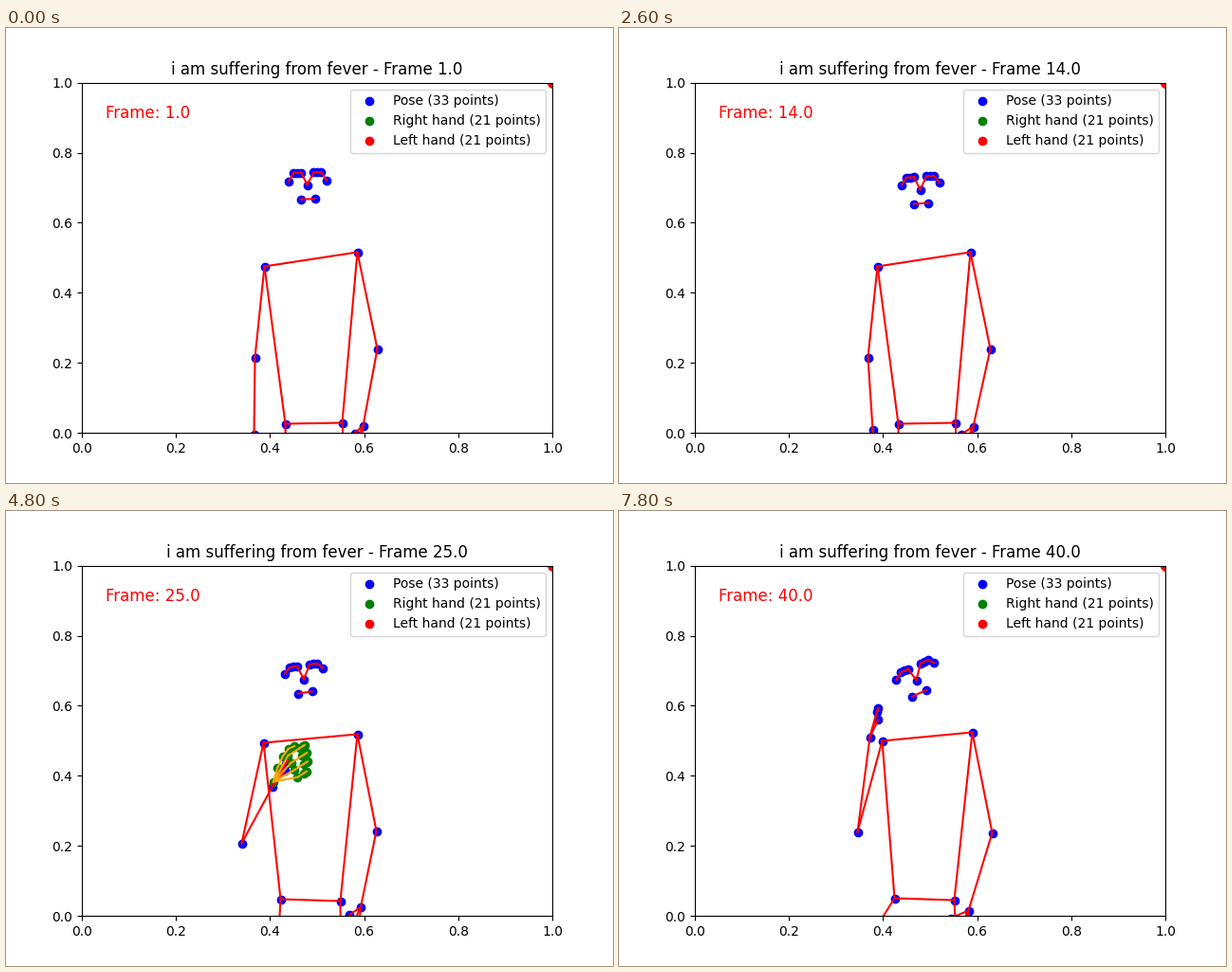
A matplotlib script that plays this animation: 640x480 px, repeating every 8 s.

```python
import numpy as np
import matplotlib.pyplot as plt
from matplotlib.animation import FuncAnimation
from matplotlib.collections import LineCollection

FRAMES, INTERVAL = 40, 200
HAND_SHOWN = range(20, 33)

# Moving joints at the key frames, in stage pixels.
KEYS = [1, 9, 14, 21, 29, 34, 40]
NOSE = [(317, 165), (317, 169), (317, 170), (313, 173), (314, 181), (315, 178), (313, 178)]
TILT = [0.02, 0.07, 0.07, 0.17, 0.13, 0.12, 0.45]
RAISED = [(261, 428), (267, 423), (267, 423), (278, 289), (283, 291), (276, 282), (264, 238)]
RESTING = [(376, 419), (373, 420), (373, 420), (372, 419), (375, 416), (371, 419), (368, 421)]

# Shoulders, elbows, hips and knees with the arm down, at the chest, at the head.
ARM_DOWN, AT_CHEST, AT_HEAD = np.array([
    [(272, 251), (370, 236), (262, 347), (391, 338), (294, 417), (354, 416), (297, 600), (354, 600)],
    [(271, 244), (370, 235), (248, 350), (390, 337), (289, 409), (352, 411), (279, 590), (354, 590)],
    [(277, 242), (372, 233), (251, 338), (393, 339), (290, 408), (353, 410), (176, 590), (361, 590)],
])

POSE_LINKS = [(0, 1), (1, 2), (2, 3), (3, 4), (0, 5), (5, 6), (6, 7), (7, 8),
              (9, 10), (11, 12), (11, 13), (12, 14), (11, 15), (12, 16),
              (15, 16), (15, 17), (16, 18), (13, 19), (19, 20), (19, 21),
              (20, 21), (19, 22), (14, 23), (23, 24), (23, 25), (24, 25), (23, 26)]
HAND_LINKS = [(4 * f + j if j else 0, 4 * f + j + 1)
              for f in range(5) for j in range(4)]


def ease(n, start, end):
    t = np.clip((n - start) / (end - start), 0, 1)
    return t * t * (3 - 2 * t)


def track(values, n):
    """Value at frame n, eased from key to key."""
    v = np.array(values, float)
    return v[0] + sum(ease(n, a, b) * step
                      for a, b, step in zip(KEYS, KEYS[1:], np.diff(v, axis=0)))


def to_data(px):
    px = np.array(px) + 0.5
    return np.column_stack([(px[:, 0] - 80) / 496, (427.2 - px[:, 1]) / 369.6])


def face(n):
    nose, k = track(NOSE, n), track(TILT, n)
    nod = 0.45 * (nose[1] - NOSE[0][1])

    def place(x, y, depth):
        y -= depth * nod
        return nose + (x + 0.4 * k * y + 0.5, y - k * x)

    points = [nose]
    for side in (-1, 1):
        points += [place(side * x, -13, 0.3) for x in (6.5, 10.5, 14.5)]
        points.append(place(side * 20, -4, 0.9))
    return points + [place(side * 7.5, 15, 0.2) for side in (-1, 1)]


def pose_points(n):
    lift, reach = ease(n, 14, 21), ease(n, 34, 40)
    body = ARM_DOWN + lift * (AT_CHEST - ARM_DOWN) + reach * (AT_HEAD - AT_CHEST)
    angle = np.radians(86 - 146 * lift - 14 * reach)
    palm = 29 * np.array([np.cos(angle), np.sin(angle)])
    up, low = track(RAISED, n), track(RESTING, n)
    raised = [up, up + 0.95 * palm, up + 1.1 * palm, up + 0.65 * palm + (3.5, 0)]
    resting = [low, low + (-2, 21), low + (-8, 17),
               low + (-9 - 1.2 * (376 - low[0]), 8)]
    return to_data(np.vstack([face(n), body, raised, resting]))


def hand_points(n):
    """Wrist, arched thumb and four fingers fanned over the knuckle line."""
    if n not in HAND_SHOWN:
        return np.ones((21, 2))
    turn = ease(n, 21, 29)
    u = np.arange(1, 5) / 4
    points = [(0, 0), *zip(23 * u ** 1.2, -41 * np.sin(u * np.pi / 2))]
    for f in range(4):
        knuckle = np.array([16 + 3.4 * f, -30 + 8.3 * f])
        length = 18 - 0.9 * f * f
        points += [knuckle + t * length * np.array([1, -0.68])
                   for t in (0, 0.7, 0.9, 1)]
    root = track(RAISED, n) + (2 * turn, -2 - 6 * turn)
    return to_data(root + np.array(points) * (1 - 0.07 * turn, 1 - 0.17 * turn))


fig, ax = plt.subplots(figsize=(6.4, 4.8), dpi=100)
ax.set_xlim(0, 1)
ax.set_ylim(0, 1)
corner = np.ones(21)
pose_dots = ax.scatter(corner, corner, c="blue", label="Pose (33 points)")
hand_dots = ax.scatter(corner, corner, c="green", label="Right hand (21 points)")
ax.scatter(corner, corner, c="red", label="Left hand (21 points)")
pose_lines, hand_lines = (
    ax.add_collection(LineCollection([], colors=c, linewidths=1.5, zorder=2,
                                     capstyle="projecting"), autolim=False)
    for c in ("red", "orange"))
title = ax.set_title("")
counter = ax.text(0.05, 0.9, "", fontsize=12, color="red")
ax.legend(loc="upper right")


def update(i):
    n = i + 1
    pose, hand = pose_points(n), hand_points(n)
    pose_dots.set_offsets(pose)
    hand_dots.set_offsets(hand)
    pose_lines.set_segments([pose[list(k)] for k in POSE_LINKS])
    hand_lines.set_segments([hand[list(k)] for k in HAND_LINKS]
                            if n in HAND_SHOWN else [])
    title.set_text(f"i am suffering from fever - Frame {n:.1f}")
    counter.set_text(f"Frame: {n:.1f}")
    return pose_dots, hand_dots, pose_lines, hand_lines, title, counter


anim = FuncAnimation(fig, update, frames=FRAMES, interval=INTERVAL,
                     repeat=True, repeat_delay=0)
plt.show()
```
